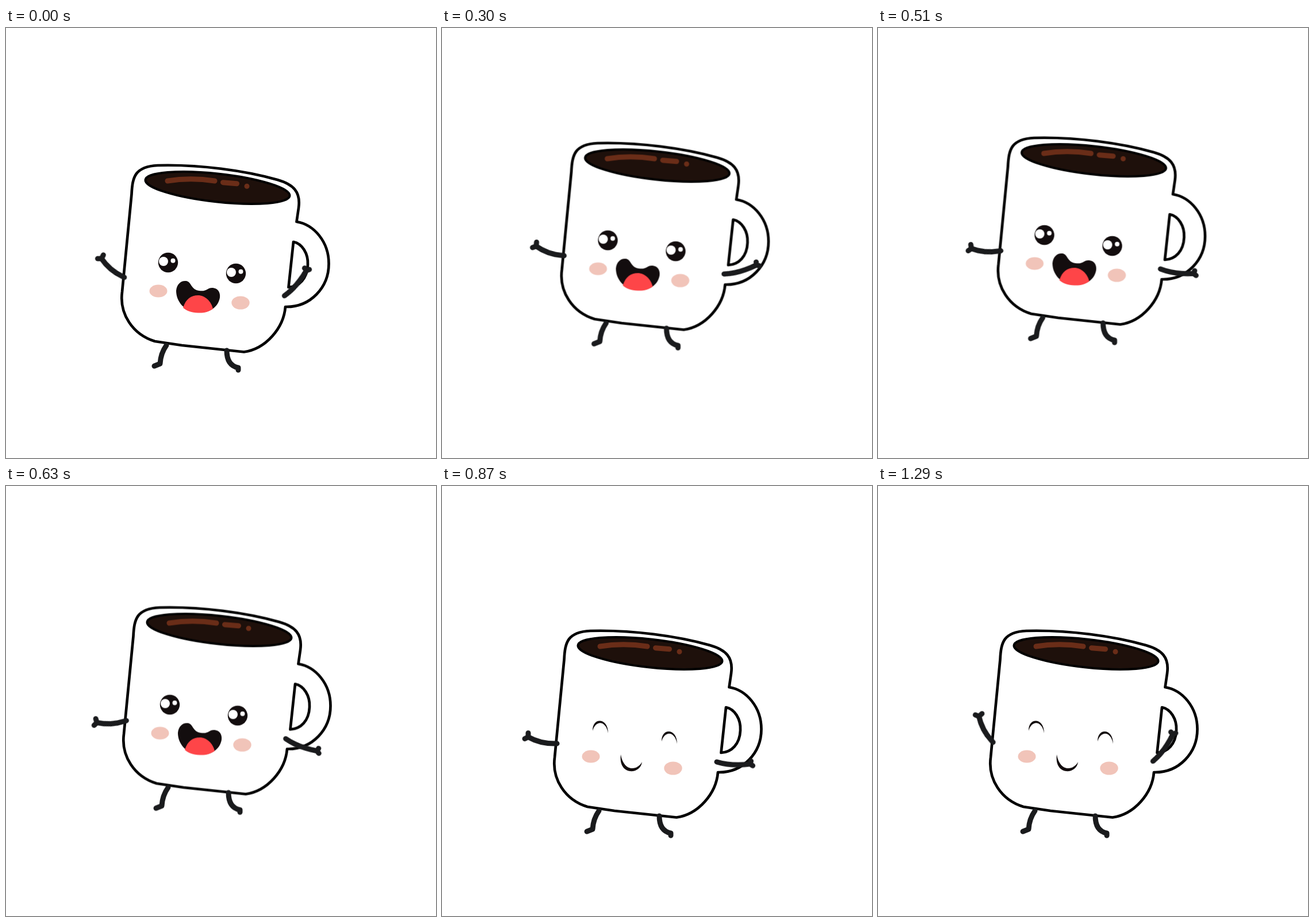
Recreate the animation shown at these times as an HTML page without scripts. Size 748 px wide and 748 px high, loop 1.53 s.

```html
<!DOCTYPE html>
<html lang="en">
<head>
<meta charset="utf-8">
<title>Jumping coffee mug</title>
<style>
  html, body { margin: 0; width: 100%; height: 100%; overflow: hidden; background: #fff; }
  svg { display: block; width: 100%; height: 100%; }

  /* Every part shares one 1530 ms loop, advanced in 30 ms steps. */
  .mug, .arm, .face { animation: 1530ms -1ms infinite; }
  .mug { animation-name: jump; }
  .arm-left { animation-name: wave-left; transform-origin: 202.5px 447px; }
  .arm-right { animation-name: wave-right; transform-origin: 477px 479px; }
  .face { animation-timing-function: step-end; }
  .happy { animation-name: airborne; }
  .content { animation-name: landed; }

  @keyframes jump {
    0% { transform: translate(6px, -13px); animation-timing-function: steps(15); }
    29.4118% { transform: translate(15.7px, -71px); animation-timing-function: steps(14); }
    56.8627%, 100% { transform: none; }
  }
  @keyframes wave-left {
    0% { transform: rotate(26.5deg); animation-timing-function: steps(23); }
    45.098% { transform: rotate(-21deg); animation-timing-function: steps(20); }
    84.3137%, 100% { transform: rotate(48.5deg); }
  }
  @keyframes wave-right {
    0% { transform: rotate(-53deg); animation-timing-function: steps(23); }
    45.098% { transform: rotate(24deg); animation-timing-function: steps(20); }
    84.3137%, 100% { transform: rotate(-57.5deg); }
  }
  @keyframes airborne {
    0% { visibility: visible; }
    56.8627%, 100% { visibility: hidden; }
  }
  @keyframes landed {
    0% { visibility: hidden; }
    56.8627%, 100% { visibility: visible; }
  }

  .outline { fill: #fff; stroke: #000; stroke-width: 4.7; stroke-linejoin: round; }
  .limb { fill: none; stroke: #1a1b1d; stroke-width: 9; stroke-linecap: round; stroke-linejoin: round; }
  .shine { fill: none; stroke: #6a2d18; stroke-width: 9; stroke-linecap: round; }
  .ink { fill: #130d0e; }
  .cheek { fill: #f1c4b9; }
</style>
</head>
<body>
<svg viewBox="0 0 748 748">
  <defs>
    <g id="open-eye">
      <circle class="ink" r="17.2"/>
      <circle cx="-8" cy="-2" r="8" fill="#fff"/>
      <circle cx="8.5" cy="-3.2" r="4" fill="#fff"/>
    </g>
    <path id="closed-eye" class="ink" d="M262 426C261 402 289 402 289 430C285 407 267 407 262 426Z"/>
  </defs>

  <g class="mug">
    <!-- cup and handle -->
    <path class="outline" d="M212.5 302C214 272 218 254 258 252C330 250 410 261 466 277
      C494 285 507 298 503 326L499.5 350C530 355 555.5 385 555.5 423C555.5 464 524 499 480 498
      C477 535 446 571 408 576.5L300 565L253 558C214 546 191 510 196 472Z"/>
    <path class="outline" d="M494 385C509 388 520 405 519 425C518 449 504 463 485.5 464Z"/>

    <!-- coffee -->
    <ellipse cx="362" cy="291" rx="126.3" ry="24.5" transform="rotate(6.3 362 291)"
      fill="#1e100b" stroke="#000" stroke-width="4"/>
    <path class="shine" d="M275 279Q315 272.5 357 279M371.5 281.7L395.5 283.7M413 288.3h.01"/>

    <!-- legs -->
    <path class="limb" d="M273 565Q263 579 262 597L252 601M378 574Q378 600 398 604L398 608"/>

    <!-- face -->
    <ellipse class="cheek" cx="259" cy="470.5" rx="15.5" ry="11"/>
    <ellipse class="cheek" cx="402" cy="491" rx="15.7" ry="11.5"/>
    <g class="face happy">
      <use href="#open-eye" x="276" y="421"/>
      <use href="#open-eye" x="394" y="440"/>
      <g transform="translate(-6 13)">
        <path class="ink" d="M296 457C297 445 305 439 313 440C323 441 321 455 336 457
          C350 459 350 451 360 452C369 453 373 460 372 469C369 486 354 496 334 495
          C310 493 296 476 296 457Z"/>
        <path fill="#fe4548" d="M308 486.5C313 471 322 465 334 465C346 465 357 475 360 488.5
          C352 494 344 496 334 495.5C323 495 314 492 308 486.5Z"/>
      </g>
    </g>
    <g class="face content">
      <use href="#closed-eye"/>
      <use href="#closed-eye" x="120" y="18.5"/>
      <path class="ink" d="M311 467C306 504 345 503 348 480C339 496 316 497 311 467Z"/>
    </g>

    <!-- arms -->
    <path class="limb arm arm-left" d="M200 448Q172 449 150 436.5L144 439.5M150 436.5L150 429.5"/>
    <path class="limb arm arm-right" d="M478 480Q504 488 536 484L537.5 479M536 484L540.5 487"/>
  </g>
</svg>
</body>
</html>
```
